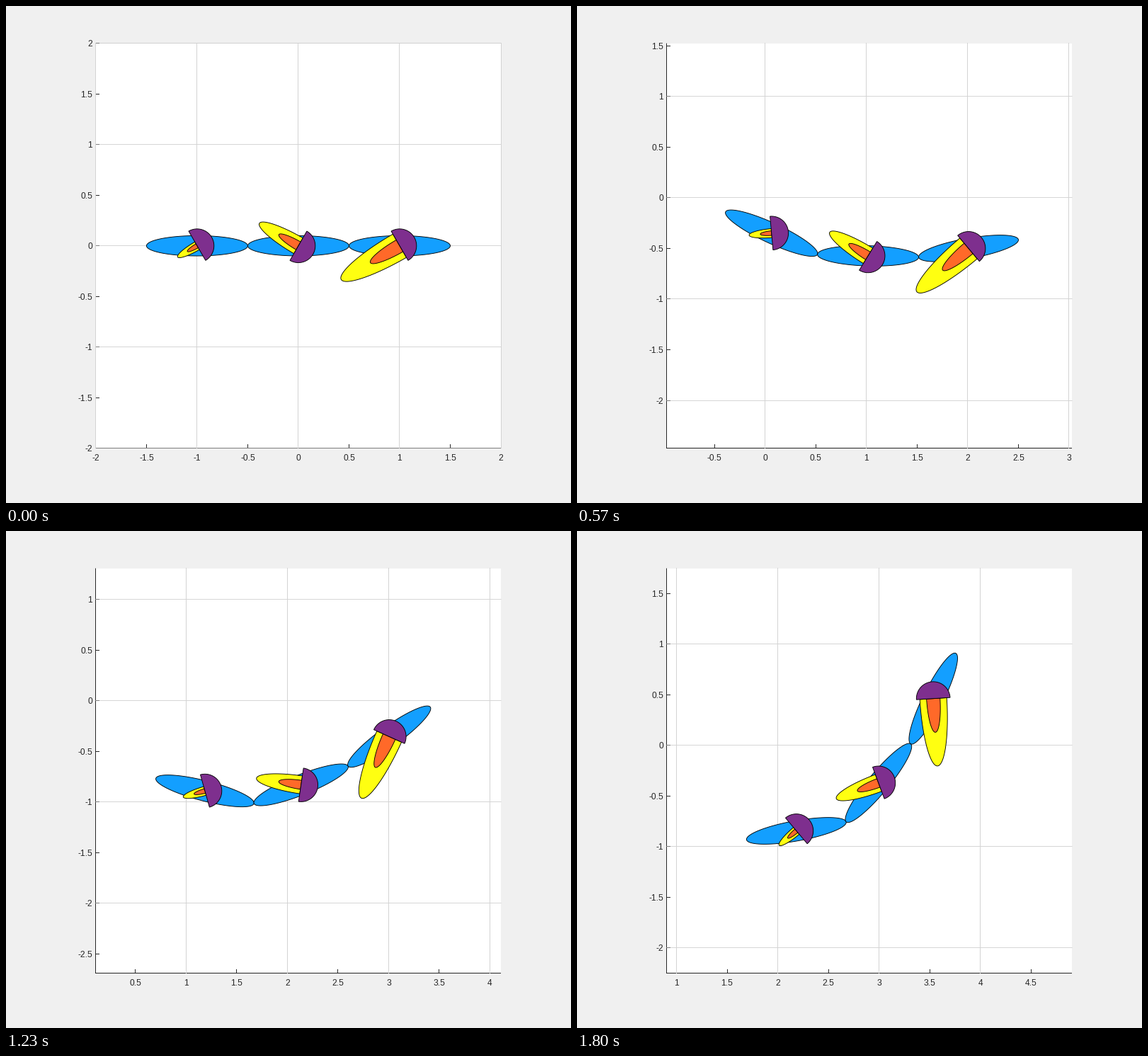
A matplotlib script for the animation above (1830 ms loop, 798 by 702 pixels).

```python
import numpy as np
import matplotlib.pyplot as plt
from matplotlib.animation import FuncAnimation
from matplotlib.collections import LineCollection
from matplotlib.patches import Polygon, Rectangle

W, H, DPI = 798, 702, 96
PT = 72 / DPI
FRAMES, INTERVAL = 61, 30

# plot box in pixels, four data units wide
LEFT, TOP, SIZE = 126.9, 52.65, 572.1
RIGHT, BOTTOM = LEFT + SIZE, TOP + SIZE
SCALE = SIZE / 4

INK = "#262626"
BLUE, YELLOW, ORANGE, PURPLE = "#139fff", "#ffff11", "#ff6929", "#7e2f8e"

# key poses: centre of mass and heading of each link in degrees
KEYS = np.array([0, 12, 26, 34, 41, 50, 60]) / 60
POSES = [
    [0, .667, 1.3805, 1.7735, 2.1086, 2.5155, 2.905],
    [0, -.29, -.6185, -.7024, -.6926, -.5541, -.252],
    [0, -20.2, -25.0, -21.1, -14.2, -3.5, 10.1],
    [0, -4.4, 3.9, 12.6, 21.6, 34.7, 50.4],
    [0, 4.6, 17.0, 26.5, 35.7, 48.5, 63.6],
]
WEIGHTS = [50, 1, 1, 1, 1, 1, 1]
CURVES = [np.polyfit(KEYS, p, 5, w=WEIGHTS) for p in POSES]

NOZZLE = np.radians([30, -30, 30])
PLUME = np.array([1, 2, 3]) * 2 / 9


def arc(a, b, start, stop, n=90):
    t = np.linspace(start, stop, n)
    return np.column_stack([a * np.cos(t), b * np.sin(t)])


def turn(pts, angle):
    c, s = np.cos(angle), np.sin(angle)
    return pts @ np.array([[c, s], [-s, c]])


def half(a, b, back=True):
    mid = np.pi if back else 0
    return arc(a, b, mid - np.pi / 2, mid + np.pi / 2)


# (outline in the link's own frame, colour) for every link, back to front
PARTS = [
    [(arc(.5, .1, 0, 2 * np.pi), BLUE),
     (turn(half(p, p / 5), n), YELLOW),
     (turn(half(p / 2, p / 10), n), ORANGE),
     (turn(half(1 / 6, 1 / 6, back=False), n), PURPLE)]
    for p, n in zip(PLUME, NOZZLE)
]

fig = plt.figure(figsize=(W / DPI, H / DPI), dpi=DPI, facecolor="#f0f0f0")
ax = fig.add_axes([0, 0, 1, 1])
ax.set(xlim=(0, W), ylim=(H, 0))
ax.axis("off")

ax.add_patch(Rectangle((127, 53), 572, 572, fc="white", ec="none", zorder=0))


def line_set(color, z):
    lines = LineCollection([], colors=[color], linewidths=PT, zorder=z)
    lines.set_snap(False)
    return ax.add_collection(lines, autolim=False)


frame_lines = line_set(INK, 1)
rows = line_set((.737, .737, .737, .6), 2)
cols = line_set("#d3d3d3", 2)

font = dict(family="Liberation Sans", size=12 * PT, color=INK, va="baseline")
x_labels = [ax.text(0, 642, "", ha="center", **font) for _ in range(9)]
y_labels = [ax.text(122, 0, "", ha="right", **font) for _ in range(9)]

shapes = [
    [ax.add_patch(Polygon(pts, closed=True, fc=color, ec="black",
                          lw=.9 * PT, zorder=3, joinstyle="miter"))
     for pts, color in parts]
    for parts in PARTS
]


def pixel(v):
    return np.floor(v + 1e-6) + .5


def ticks(mid):
    first = np.ceil((mid - 2) * 2 - 1e-6)
    last = np.floor((mid + 2) * 2 + 1e-6)
    return np.arange(first, last + 1) / 2


def show_labels(labels, values, place):
    for i, label in enumerate(labels):
        label.set_visible(i < len(values))
        if i < len(values):
            label.set_text(f"{values[i] + 0:g}")
            place(label, values[i])


def update(i):
    cx, cy, *heading = [np.polyval(c, i / 60) for c in CURVES]
    if i == 0:
        cx, cy, heading = 0.0, 0.0, [0.0] * 3

    def to_x(x):
        return LEFT + (x - cx + 2) * SCALE

    def to_y(y):
        return TOP + (cy + 2 - y) * SCALE

    # chain hinged end to end, placed around its centre of mass
    angles = np.radians(heading)
    axes = np.column_stack([np.cos(angles), np.sin(angles)])
    centres = np.cumsum(axes, axis=0) - axes / 2
    centres += np.array([cx, cy]) - centres.mean(axis=0)
    for parts, patches, pos, a in zip(PARTS, shapes, centres, angles):
        for (pts, _), patch in zip(parts, patches):
            p = turn(pts, a) + pos
            patch.set_xy(np.column_stack([to_x(p[:, 0]), to_y(p[:, 1])]))

    xs, ys = ticks(cx), ticks(cy)
    x0, y0 = pixel(LEFT), pixel(BOTTOM)
    marks = [[(x0, TOP), (x0, y0 + .5)], [(x0 - .5, y0), (RIGHT, y0)]]
    marks += [[(pixel(to_x(x)), y0), (pixel(to_x(x)), y0 - 5.5)] for x in xs]
    marks += [[(x0, pixel(to_y(y))), (x0 + 5.5, pixel(to_y(y)))] for y in ys]
    frame_lines.set_segments(marks)
    cols.set_segments([[(pixel(to_x(x)), 52), (pixel(to_x(x)), 625)]
                       for x in xs if x % 1 == 0])
    rows.set_segments([[(126, pixel(to_y(y))), (699.5, pixel(to_y(y)))]
                       for y in ys if y % 1 == 0])

    show_labels(x_labels, xs, lambda t, x: t.set_x(to_x(x)))
    show_labels(y_labels, ys, lambda t, y: t.set_y(to_y(y) + 4.5))
    return []


anim = FuncAnimation(fig, update, frames=FRAMES, interval=INTERVAL,
                     init_func=lambda: update(0), repeat=True,
                     repeat_delay=0, blit=False)
plt.show()
```
